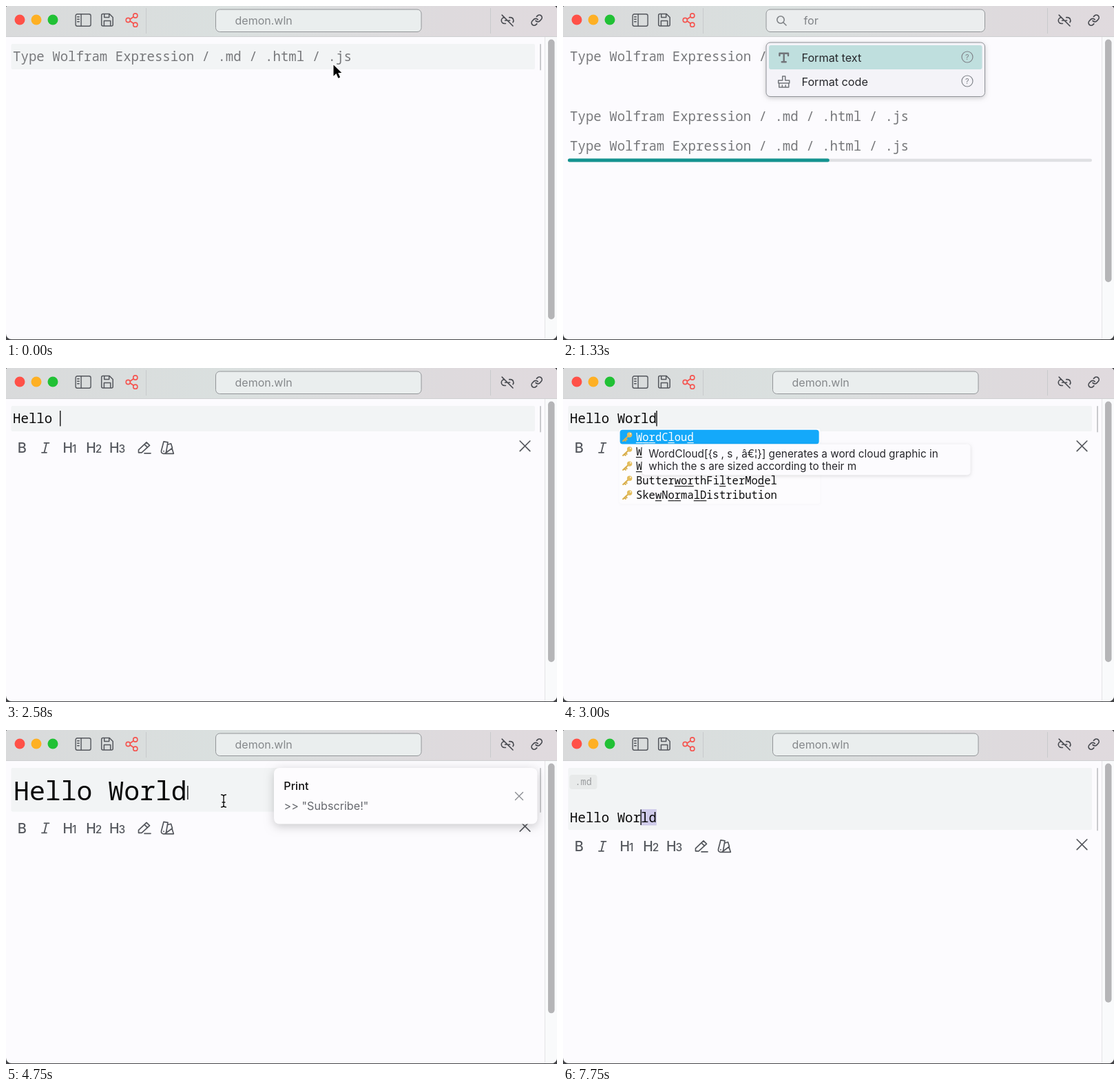
An HTML page with a canvas for the animation above (8 s loop, 800x485 px).

```html
<!DOCTYPE html>
<html lang="en">
<head>
<meta charset="utf-8">
<title>Notebook demo</title>
<style>
html, body { margin: 0; width: 100%; height: 100%; overflow: hidden; background: #444548; }
canvas { display: block; width: 800px; height: 485px; }
</style>
</head>
<body>
<canvas id="stage" width="800" height="485"></canvas>
<script>
const LOOP = 8000;
const c = document.getElementById('stage').getContext('2d');
const MONO = '"Noto Sans Mono", "DejaVu Sans Mono", monospace';
const SANS = 'Inter, Roboto, sans-serif';
const CODE = 19.07, STEP = CODE * 0.6;
const INK = '#54575d', PAGE = '#fcfbfe';
const HINT = 'Type Wolfram Expression / .md / .html / .js';
const HELLO = 'Hello World';

const NAMES = ('HaarWavelet HadamardMatrix HalfLine HalfNormalDistribution HalfPlane HalfSpace ' +
  'HalftoneShading HeavisideTheta HelmholtzPDEComponent WaitAll WaitNext WakebyDistribution ' +
  'WarpingDistance WaveletScalogram WeakStationarity WindowOpacity WordCloud WordTranslationData ' +
  'WolframLanguageData ButterworthFilterModel SkewNormalDistribution').split(' ');
const TIPS = {
  HaarWavelet: ['HaarWavelet[] represents a Haar wavelet.'],
  WordCloud: ['WordCloud[{s , s , \u00e2\u20ac\u00a6}] generates a word cloud graphic in',
    'which the s are sized according to their m']
};

const clamp = v => Math.max(0, Math.min(1, v));
const ease = v => { v = clamp(v); return v * v * (3 - 2 * v); };
const mix = (a, b, v) => a + (b - a) * v;

function box(x, y, w, h, r, fill, line) {
  c.beginPath();
  c.roundRect(x, y, w, h, r);
  if (fill) { c.fillStyle = fill; c.fill(); }
  if (line) { c.strokeStyle = line; c.lineWidth = 1; c.stroke(); }
}

function card(x, y, w, h, r, fill, line, blur, alpha) {
  c.save();
  c.shadowColor = `rgba(0,0,0,${alpha})`;
  c.shadowBlur = blur;
  c.shadowOffsetY = blur / 4;
  box(x, y, w, h, r, fill);
  c.restore();
  if (line) box(x, y, w, h, r, null, line);
}

function text(s, x, y, size, color = '#1c1c1e', font = SANS, weight = 400) {
  c.font = `${weight} ${size}px ${font}`;
  c.fillStyle = color;
  c.fillText(s, x, y);
}

// Strokes an SVG path placed at x, y
function icon(d, x, y, scale = 1, color = INK, width = 1.6) {
  c.save();
  c.translate(x, y);
  c.scale(scale, scale);
  c.strokeStyle = color;
  c.lineWidth = width / scale;
  c.lineCap = c.lineJoin = 'round';
  c.stroke(new Path2D(d));
  c.restore();
}

function dot(x, y, r, fill, line) {
  c.beginPath();
  c.arc(x, y, r, 0, 7);
  if (fill) { c.fillStyle = fill; c.fill(); }
  if (line) { c.strokeStyle = line; c.lineWidth = 1.6; c.stroke(); }
}

const cross = (x, y, r, color, w) => icon(`M${-r} ${-r}L${r} ${r}M${r} ${-r}L${-r} ${r}`, x, y, 1, color, w);

function caret(x, y, h) {
  c.fillStyle = '#000';
  c.fillRect(x, y, 1.3, h);
}

function titleBar() {
  const g = c.createLinearGradient(0, 0, 800, 0);
  g.addColorStop(0, '#d9dadb');
  g.addColorStop(0.4, '#dae0df');
  g.addColorStop(0.8, '#dedadd');
  g.addColorStop(1, '#e0dade');
  c.fillStyle = g;
  c.fillRect(0, 0, 800, 45);
  c.fillStyle = '#cfd0d2';
  c.fillRect(0, 44, 800, 1);
  c.fillStyle = '#c8cacc';
  c.fillRect(203, 3, 1, 37);
  c.fillRect(703, 3, 1, 37);
  ['#ff5148', '#feb024', '#21c135'].forEach((col, i) => dot(20 + 24 * i, 20, 7.5, col));

  box(100.7, 11.7, 22.8, 17.6, 3);
  icon('M103 0H120a2.5 2.5 0 0 1 2.5 2.5V15a2.5 2.5 0 0 1-2.5 2.5H103a2.5 2.5 0 0 1-2.5-2.5V2.5A2.5 2.5 0 0 1 103 0M108.5 0V17.5M103 4h2.6M103 7.5h2.6M103 11h2.6', 0.6, 11.7, 1, INK, 1.4);
  icon('M2 0H11.5L16.5 5V15.5a2 2 0 0 1-2 2H2a2 2 0 0 1-2-2V2a2 2 0 0 1 2-2M4 0V5H11V0M3.7 17V10H13V17', 138.7, 11.5, 1, INK, 1.5);
  icon('M180.5 19L185 15.8M180.5 22L185 25.3', 0, 0, 1, '#f5544f', 1.7);
  [[187.8, 14], [177.3, 20.5], [187.8, 27.2]].forEach(p => dot(...p, 3.1, null, '#f5544f'));

  icon('M9 17H7A5 5 0 0 1 7 7M15 7h2a5 5 0 0 1 4 8M8 12h4M3 3L21 21M14 12h2', 717.5, 10.5, 0.88, '#47494f', 1.6);
  icon('M10 13a5 5 0 0 0 7.54.54l3-3a5 5 0 0 0-7.07-7.07l-1.72 1.71M14 11a5 5 0 0 0-7.54-.54l-3 3a5 5 0 0 0 7.07 7.07l1.71-1.71', 761.5, 11.5, 0.76, '#47494f', 1.7);
}

function searchField(query) {
  const open = query !== null;
  box(open ? 295 : 304.5, 5, open ? 317.5 : 298.5, 32.5, 6, open ? '#ebedee' : '#eaeeee', '#929598');
  if (!open) {
    text('demon.wln', 332.5, 27, 16, '#85888b');
    return;
  }
  dot(316, 20, 5.2, null, '#7f8286');
  icon('M320 24L324 28', 0, 0, 1, '#7f8286');
  text(query, 349.5, 27, 16.2, '#808387');
  if (!query) return;
  card(295, 53, 317.5, 78.5, 6, '#f4f3f8', '#8f9297', 7, 0.22);
  box(299, 57, 309.5, 35, 3, '#bfdfde');
  icon('M-6.3 -3V-6.3H6.3V-3M0 -6V6M-3 6.3H3', 320.7, 75, 1, '#717479', 2.4);
  icon('M-2 -8H2V-2H8V2H-8V-2H-2ZM-7 2V8H7V2M-2.4 8V5M2.4 8V5', 320.7, 110, 1, '#717479', 1.5);
  ['Format text', 'Format code'].forEach((label, i) => {
    text(label, 346.5, 81 + 35 * i, 16.2, '#26272b');
    c.beginPath();
    c.arc(587, 74 + 35 * i, 8, 0, 7);
    c.strokeStyle = '#80848a';
    c.lineWidth = 1.2;
    c.stroke();
    text('?', 584, 78 + 35 * i, 11, '#80848a');
  });
}

function cell(top, bottom) {
  box(7.5, top, 760.5, bottom - top, 2, '#f2f4f5');
  box(775, top, 2, bottom - top + 1.5, 1, '#c9cacd');
}

function scrollbar(bottom) {
  c.fillStyle = '#f9fafb';
  c.fillRect(782, 45, 18, 440);
  c.fillStyle = '#e4e4e7';
  c.fillRect(782, 45, 1, 440);
  box(787, 48.5, 9.5, bottom - 48.5, 4.75, '#b5b5b7');
}

function toolbar(y) {
  text('B', 16.8, y + 7.3, 20, INK, SANS, 500);
  icon('M-1.5 -7H5.5M-5 7H2M2 -7L-1.5 7', 57, y, 1, INK, 1.8);
  [1, 2, 3].forEach((n, i) => {
    text('H', 82.5 + 33.8 * i, y + 7.3, 19.5, INK, SANS, 500);
    text(n, 96 + 33.8 * i, y + 7.3, 15.5, INK, SANS, 500);
  });
  icon('M-8.5 7V3L3 -8L7.5 -3.5L-4 7ZM0 -5L4.5 -0.5M0 8H9', 201, y, 1, INK, 1.7);
  icon('M-5 -9L1 -8L-1.5 6.5Q-2.5 9 -5.5 8.5Q-9 8 -8.5 4.5ZM0.5 -4.5L5.5 -6L7.5 0.5L-2 7.5M7 1L9.3 8.5H-4.5M-5 4.8v.4', 234, y, 1, INK, 1.7);
  cross(753.5, y - 2.5, 7.3, '#54565c', 1.7);
}

// Positions of the letters of word inside name, or null
function match(name, word) {
  const hits = [];
  let at = -1;
  for (const ch of word.toLowerCase()) {
    at = name.toLowerCase().indexOf(ch, at + 1);
    if (at < 0) return null;
    hits.push(at);
  }
  return hits;
}

function prefix(name, word) {
  let n = 0;
  while (n < word.length && name[n] && name[n].toLowerCase() === word[n].toLowerCase()) n++;
  return n;
}

function key(x, y) {
  icon('M-6.5 6L1.5 -1.5M-4.5 4L-2.8 5.8M-2.6 2.2L-1 4', x, y, 1, '#d9ae4b', 2.1);
  dot(3, -3, 0);
  dot(x + 3, y - 3, 3.7, '#e3bd5d');
  dot(x + 4.3, y - 4.4, 1.1, '#fbf3dc');
}

function completions(word, x) {
  const list = NAMES.filter(n => match(n, word) && (word.length > 1 || prefix(n, word)))
    .sort((a, b) => prefix(b, word) - prefix(a, word)).slice(0, 7);
  if (!list.length) return;
  const width = x < 50 ? 315 : 289, size = 15.52, adv = size * 0.6, pitch = 21.05;
  card(x - 1, 88, width + 3, list.length * pitch + 4, 4, '#fdfcfe', null, 2, 0.03);
  box(x, 89.7, width, 20.8, 4, '#14a9fa');
  list.forEach((name, i) => {
    const y = 106 + pitch * i, color = i ? '#0c0c0d' : '#fff';
    key(x + 11, y - 6);
    text(name, x + 23.3, y, size, color, MONO);
    match(name, word).forEach(k => c.fillRect(x + 23.3 + k * adv, y + 2, adv, 1.1));
  });
  const tip = TIPS[list[0]];
  if (!tip) return;
  const below = tip.length > 1, tx = below ? x + 32 : x + width + 5;
  card(tx, below ? 110.5 : 89.5, below ? 477 : 322, below ? 45 : 26, 5, '#fcfbfe', null, 5, 0.13);
  tip.forEach((s, i) => text(s, below ? tx + 9.5 : tx + 11, (below ? 129.5 : 108) + 18.3 * i, 15.3, '#26262a'));
}

function notice(a) {
  if (a <= 0) return;
  c.save();
  c.globalAlpha = a;
  c.translate(30 * (1 - a), 0);
  card(389, 55, 382.5, 81.5, 8, '#fdfcfe', null, 14, 0.2);
  text('Print', 403.3, 87, 16.2, '#111', SANS, 500);
  text('>> "Subscribe!"', 403.5, 116, 16.2, '#66686e');
  cross(745, 96, 5.5, '#8a8c92', 1.4);
  c.restore();
}

function arrow(x, y) {
  c.save();
  c.translate(x, y);
  const p = new Path2D('M0 0V16.2L3.9 12.6L6.9 19.2L9.6 18L6.7 11.6H11.8Z');
  c.strokeStyle = '#fff';
  c.lineWidth = 2;
  c.stroke(p);
  c.fillStyle = '#000';
  c.fill(p);
  c.restore();
}

function beam(x, y) {
  const d = 'M-3.5 -9Q0 -9 0 -6.5Q0 -9 3.5 -9M0 -7V7M-3.5 9Q0 9 0 6.5Q0 9 3.5 9M-2 2H2';
  icon(d, x, y, 1, '#fff', 3);
  icon(d, x, y, 1, '#111', 1.4);
}

function intro(t) {
  const added = (t >= 250) + (t >= 420) + (t >= 580);
  const searching = t >= 830 && t < 1750;
  scrollbar(455 - 18 * added);
  if (!searching) {
    const top = [55, 98, 142, 185][added];
    cell(top, top + (added > 2 ? 34 : 37));
  }
  text(HINT, 10, 80, CODE, '#77787b', MONO);
  if (added > 1) text(HINT, 10, 167, CODE, '#77787b', MONO);
  if (added > 2) {
    text(HINT, 10, 210, CODE, '#77787b', MONO);
    box(7, 221.8, 761, 4.4, 2.2, '#dfe0e3');
    box(7, 221.5, Math.max(5, 761 * clamp((t - 600) / 1465)), 5, 2.5, '#149390');
  }
  if (t < 420) arrow(475.5, 85.5);
  return searching ? 'format'.slice(0, clamp((t - 1070) / 510) * 6 + 0.05 | 0) : null;
}

function notebook(t) {
  const big = t >= 3900 && t < 5950, md = t >= 6320;
  const bottom = big || (md && t < 6490) ? 118.5 : md ? 145 : 92;
  let s = HELLO, n = 11;
  if (t < 3100) n = Math.floor((t - 2075) / 83.5);
  else if (t >= 5000 && t < 5950) n = 11 - Math.floor((t - 5000) / 83);
  else if (t >= 5950 && !md) { s = '.md'; n = Math.floor((t - 5995) / 83); }
  else if (md) n = Math.floor((t - 6660) / 83);
  s = s.slice(0, Math.max(0, n));

  const empty = !s && !md && !big;
  scrollbar(empty ? 455 : 427 - (bottom - 92) * 0.59);
  cell(55, bottom);
  if (!empty) toolbar(bottom + 23.8);

  if (md) {
    box(9.5, 65, 40, 21, 4, '#e8eaea');
    text('.md', 17.5, 79.5, 13.5, '#9b9d9f', MONO);
  }
  const lineTop = md ? (t < 6490 ? 88.5 : 115.5) : 62;
  const picked = t >= 7640 ? Math.floor((t - 7560) / 83) : !md && t >= 3500 && t < 3900 ? 11 : 0;
  const end = 10 + (s.length - picked) * STEP;
  if (picked) {
    c.fillStyle = '#cfcbea';
    c.fillRect(end, lineTop - 0.5, picked * STEP, 23.5);
  }
  if (big) {
    text(s, 11, 102, CODE * 2, '#080808', MONO, 500);
    caret(11.5 + s.length * STEP * 2, 81, 20);
  } else {
    if (empty) text(HINT, 10, 80, CODE, '#77787b', MONO);
    text(s, 10, lineTop + 18, CODE, '#080808', MONO);
    caret(end - 0.5, lineTop, 22.5);
  }

  if (t < 3250) {
    const word = s.split(' ').pop();
    if (word) completions(word, 14 + (s.length - word.length) * STEP);
  }
  notice(ease((t - 4300) / 200) * (1 - ease((t - 5000) / 250)));

  if (t >= 3330 && t < 3950) {
    const v = ease((t - 3330) / 480);
    arrow(mix(320, 94, v), mix(230, 117, v));
  } else if (t >= 3950 && t < 5000) {
    const v = ease((t - 3950) / 500);
    beam(mix(97, 316, v), mix(117, 103, v));
  }
}

function draw(t) {
  c.fillStyle = '#444548';
  c.fillRect(0, 0, 800, 485);
  c.save();
  c.beginPath();
  c.roundRect(0, 0, 800, 484, [3, 5, 8, 8]);
  c.clip();
  c.fillStyle = PAGE;
  c.fillRect(0, 0, 800, 485);
  titleBar();
  const query = t < 2000 ? intro(t) : notebook(t);
  searchField(query ?? null);
  c.restore();
}

const start = performance.now();
function tick() {
  draw((performance.now() - start) % LOOP);
  requestAnimationFrame(tick);
}
tick();
</script>
</body>
</html>
```
